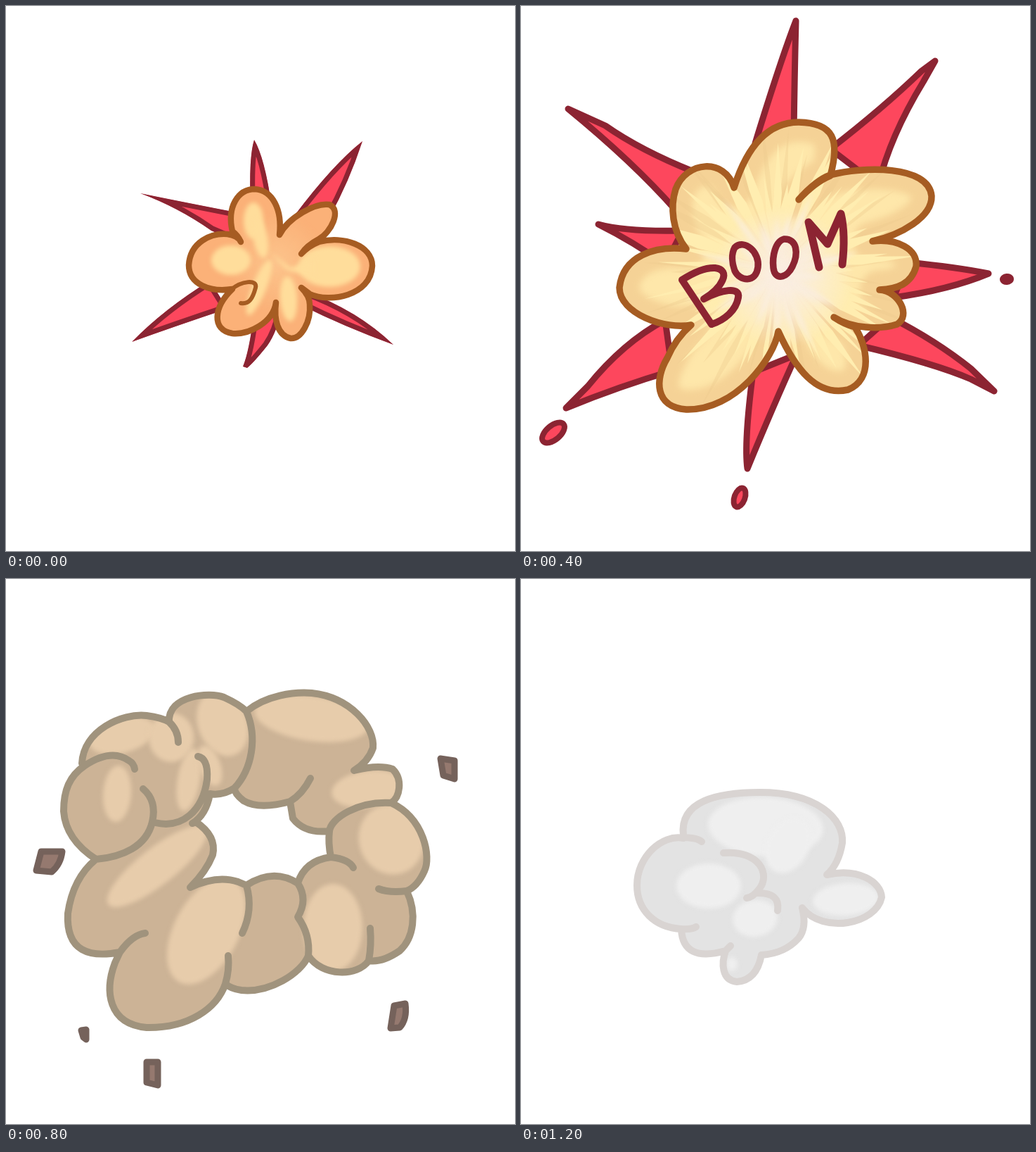
These frames come from a looping animation (724 px wide and 774 px high, 1400 ms). An HTML page with a canvas:

```html
<!DOCTYPE html>
<html>
<head>
<meta charset="utf-8">
<title>Boom</title>
<style>
html, body { margin: 0; width: 100%; height: 100%; overflow: hidden; background: #fff }
canvas { display: block }
</style>
</head>
<body>
<canvas width="724" height="774"></canvas>
<script>
const g = document.querySelector('canvas').getContext('2d');
g.lineJoin = g.lineCap = 'round';
const TAU = Math.PI * 2;

const fill = (d, color, rule = 'nonzero') => { g.fillStyle = color; g.fill(new Path2D(d), rule); };
const line = (d, color, w) => { g.strokeStyle = color; g.lineWidth = w; g.stroke(new Path2D(d)); };

function clipped(d, paint, rule = 'nonzero') {
  g.save();
  g.clip(new Path2D(d), rule);
  paint();
  g.restore();
}

function soft(px, paint) {
  g.filter = `blur(${px}px)`;
  paint();
  g.filter = 'none';
}

// spikes with needle tips: the outline lies inside the shape
const sharp = (list, color, edge, w) => list.forEach(d => clipped(d, () => {
  fill(d, color);
  line(d + 'Z', edge, w * 2);
}));

const chips = (list, color, edge, w) => list.forEach(d => { fill(d, color); line(d + 'Z', edge, w); });

// ellipses: [x, y, rx, ry, degrees]
const blobs = (list, color, edge, w) => list.forEach(([x, y, rx, ry, deg = 0]) => {
  g.beginPath();
  g.ellipse(x, y, rx, ry, deg * TAU / 360, 0, TAU);
  g.fillStyle = color;
  g.fill();
  if (edge) { g.strokeStyle = edge; g.lineWidth = w; g.stroke(); }
});

function glow(x, y, r, rgb, solid = 0) {
  const c = g.createRadialGradient(x, y, 0, x, y, r);
  c.addColorStop(solid, `rgba(${rgb},1)`);
  c.addColorStop(1, `rgba(${rgb},0)`);
  g.fillStyle = c;
  g.fillRect(x - r, y - r, 2 * r, 2 * r);
}

// brush strokes fanning out from a centre
function rays(x, y, n, near, far, w, color, seed) {
  const rnd = () => { seed = (seed * 16807) % 2147483647; return seed / 2147483647; };
  g.fillStyle = color;
  for (let i = 0; i < n; i++) {
    const r = near + (far - near) * rnd(), b = w * (.4 + .6 * rnd());
    g.save();
    g.translate(x, y);
    g.rotate((i + rnd()) / n * TAU);
    g.beginPath();
    g.moveTo(r * .15, 0);
    g.lineTo(r * .6, b);
    g.lineTo(r, 0);
    g.lineTo(r * .6, -b);
    g.fill();
    g.restore();
  }
}

const RED = '#fd475d', WINE = '#8c2432', RUST = '#a65c22', CREAM = '#ffedb0';

function spark() {
  sharp([
    'M191 266Q250 278 322 292L330 335L292 319Q245 286 191 266',
    'M353 190Q345 215 348 285L378 285Q368 215 353 190',
    'M507 192Q465 225 410 298L460 300Q488 250 507 192',
    'M551 481Q500 432 425 405L420 425Q480 455 551 481',
    'M337 512Q346 490 352 440L392 430Q386 462 372 482Q352 507 343 514',
    'M179 477Q225 430 290 390L315 430Q240 455 179 477'], RED, WINE, 7);
  const body = 'M322 320C314 285 330 260 354 260C380 262 393 290 389 325C402 300 440 279 460 282C478 290 462 322 445 331Q428 340 420 352' +
    'Q430 341 445 335C480 326 521 340 521 369C519 412 460 422 432 409L420 400Q432 412 432 424C434 448 420 473 405 472C386 468 381 445 384 421' +
    'C380 450 345 467 322 465C292 460 295 428 322 402C290 407 260 395 260 368C262 335 292 322 315 324Q330 326 334 335Q330 326 322 320Z';
  fill(body, '#fbb178');
  clipped(body, () => soft(3, () => {
    glow(385, 365, 70, '252,196,140');
    blobs([[320, 361, 28, 21], [352, 305, 14, 26], [362, 330, 10, 28, -10], [460, 370, 44, 29], [402, 416, 12, 32, -4], [360, 400, 10, 42, 22]], '#ffdd9b');
    fill('M375 350L405 372L440 358L440 385L400 375Z', '#ffdd9b');
  }));
  line(body, RUST, 8.5);
  line('M320 403C335 390 358 388 355 400C351 415 346 424 334 422', RUST, 6);
}

function burst() {
  sharp([
    'M65 149L120 172Q200 220 290 267L235 305Q160 230 95 185',
    'M351 136Q338 160 328 225L372 215Q365 165 351 136',
    'M566 102L527 135Q480 170 420 232L475 270Q510 190 553 140',
    'M575 384Q545 366 490 360L490 389Q540 378 575 384',
    'M642 533L620 505Q560 460 505 422L440 450Q530 495 605 522',
    'M337 610L330 592Q319 550 322 470L390 470Q372 535 352 590',
    'M79 554L105 520Q150 470 215 442L270 484Q180 510 125 538'], RED, WINE, 9);
  const body = 'M320 318C305 295 314 250 330 226C355 185 420 183 432 218C438 246 420 262 405 283C430 255 512 240 520 278C526 305 500 325 482 335' +
    'Q440 332 422 347Q440 334 482 336C515 347 512 380 498 392Q490 402 477 406L490 405C514 414 524 445 508 454C490 460 470 455 452 446' +
    'C460 480 455 524 435 530C405 533 376 480 381 425L300 500Q275 522 262 514C252 505 258 485 265 468C235 475 200 465 198 440' +
    'C196 400 228 362 264 354L248 354C220 345 210 315 214 295C225 260 288 250 304 280Q308 305 320 318Z';
  fill(body, '#fcd797');
  clipped(body, () => {
    soft(9, () => line(body, '#efb985', 44));
    soft(2, () => {
      rays(365, 345, 26, 120, 200, 9, 'rgba(225,170,115,.35)', 11);
      glow(370, 345, 115, '255,237,176', .25);
      rays(368, 345, 30, 90, 165, 8, 'rgba(255,237,176,.85)', 5);
    });
    const curl = 'M262 514C250 500 264 465 278 450C300 420 335 395 352 403C355 415 335 450 300 500Z';
    soft(2, () => fill(curl, '#f3c68b'));
  });
  line(body, RUST, 8);
  line('M262 505C255 500 264 467 278 450C300 418 340 393 352 403C354 415 335 440 322 453Q309 465 300 459Q301 443 316 441', RUST, 7);
}

function boom() {
  chips([
    'M391 21Q370 75 333 195L388 185Q389 100 391 21',
    'M589 78L570 92Q515 145 440 203L508 255Q525 185 572 108',
    'M67 146L120 170Q170 205 245 235L220 290Q160 222 67 146',
    'M110 310Q150 321 230 319L205 367Q160 335 110 310',
    'M64 571L95 540Q145 478 205 446L215 518Q140 540 64 571',
    'M322 657Q317 620 330 520L392 495Q360 565 322 657',
    'M673 547L640 515Q590 475 525 442L480 482Q590 508 640 530',
    'M665 380Q620 371 550 364L530 414Q610 403 665 380'], RED, WINE, 9);
  blobs([[46, 606, 19, 10, -40], [311, 698, 7.5, 14, 20], [691, 388, 6, 4, -5]], RED, WINE, 8);
  const body = 'M303 258C315 220 340 165 395 165C445 166 454 190 440 241Q418 250 395 275Q420 247 440 240C485 228 580 225 584 270C585 300 540 325 500 334' +
    'C535 330 565 345 562 370C555 395 535 402 510 403C538 405 555 440 535 452C510 460 470 458 445 442Q460 452 475 456C492 482 502 530 465 545' +
    'C420 555 390 515 366 462C360 500 305 575 235 573C190 570 190 530 208 500Q220 472 242 453C205 460 140 437 140 400C145 355 190 340 235 345' +
    'C215 320 212 285 220 260C235 220 290 215 303 258Z';
  fill(body, '#fee7aa');
  clipped(body, () => {
    soft(5, () => line(body, '#f5d296', 56));
    rays(365, 372, 36, 150, 225, 7, 'rgba(235,200,140,.35)', 21);
    rays(365, 372, 60, 110, 205, 8, CREAM, 7);
    soft(3, () => {
      glow(372, 385, 100, '251,238,224', .2);
      rays(365, 380, 20, 70, 140, 7, 'rgba(251,238,224,.8)', 3);
    });
  });
  line(body, RUST, 9.5);
  line('M229 389L271 452M229 389Q257 371 276 372C300 375 286 400 260 416C285 403 312 398 309 414C306 432 290 446 271 452', WINE, 10);
  line('M304 343C318 330 340 350 337 371C334 394 311 391 304 376C300 365 299 352 304 343', WINE, 9.5);
  line('M374 331C393 330 395 352 386 370C378 387 361 390 359 372C357 355 362 334 374 331', WINE, 9.5);
  line('M424 371L409 307L436 338L455 295Q462 325 457 367', WINE, 11);
}

function flower() {
  const red = '#c24555', dark = '#571420', edge = '#9f7b4f';
  sharp([
    'M24 184L50 167Q115 152 195 195L160 230Q105 180 50 181',
    'M632 87Q555 90 485 155L470 225L515 215Q560 140 632 87',
    'M515 475L565 477Q617 515 584 633Q578 525 520 511',
    'M382 684Q345 640 330 520L377 530Q372 620 382 684',
    'M109 567Q100 520 178 440L178 485Q130 535 116 568'], red, dark, 9);
  blobs([[103, 608, 7.5, 16, 10]], red, dark, 8);
  const body = 'M317 260Q312 235 303 215C300 160 350 85 420 85C490 88 502 165 478 212Q465 235 438 241Q455 238 467 225C500 200 560 195 590 222' +
    'C630 265 595 330 545 354Q515 367 484 370Q515 367 545 356C600 350 635 375 635 412C630 460 565 480 522 472Q505 450 470 435Q510 455 522 482' +
    'C540 555 480 575 445 570C400 565 365 535 347 500L348 490L347 500C330 550 270 585 225 582C160 575 155 510 175 460C190 420 215 393 255 400' +
    'Q210 393 182 441C150 450 120 435 121 415C125 375 155 360 180 355Q210 350 221 358Q205 351 180 353C135 335 118 285 130 245' +
    'C150 185 210 175 245 182C285 190 305 215 317 260Z';
  fill(body, '#dfb98a');
  clipped(body, () => {
    soft(3, () => {
      blobs([[410, 180, 58, 82, 22], [240, 275, 55, 72, -40], [500, 288, 40, 78, 45], [538, 407, 65, 25, -6], [440, 485, 42, 72, -42],
        [268, 475, 50, 78, 30], [200, 398, 45, 16, -25]], '#eecda4');
      glow(355, 350, 175, '232,208,152', .15);
      blobs([[383, 168, 14, 58, 15], [447, 165, 7, 28, 5], [215, 262, 15, 45, -50], [525, 280, 8, 42, 35], [182, 404, 25, 8, -30]], '#f2dba5');
      rays(355, 350, 18, 120, 185, 7, 'rgba(216,188,135,.6)', 17);
    });
    soft(1.5, () => {
      rays(355, 350, 17, 90, 150, 11, CREAM, 9);
      blobs([[358, 350, 38, 40]], CREAM);
    });
  });
  line(body, edge, 11.5);
  line('M334 373Q368 371 373 408', edge, 8);
}

// smoke: a base with soft lights, an outline, and crease lines
function smoke(out, hole, creases, lights, base, light, edge, w) {
  const all = out + hole;
  fill(all, base, 'evenodd');
  clipped(all, () => soft(3, () => blobs(lights, light)), 'evenodd');
  line(all + creases, edge, w);
}

function ring() {
  smoke('M108 262C110 215 165 190 200 194Q222 197 232 203C230 165 290 160 310 168Q332 178 342 188C370 165 410 160 435 162C490 168 525 210 522 240' +
    'Q515 260 495 272Q530 263 550 270C565 285 560 310 548 318C595 340 605 395 595 415Q585 437 570 443C585 475 580 510 560 528Q535 545 516 542' +
    'C500 565 450 565 430 535C420 560 375 588 335 584Q320 582 312 575C300 610 260 638 200 637C145 632 140 585 155 545L162 530' +
    'C120 538 85 530 88 475Q95 425 128 398Q85 370 82 330C82 300 90 280 112 265Z',
  'M270 345Q300 365 294 392Q285 415 262 438Q300 420 330 430L342 435Q380 410 415 432Q425 400 462 395Q458 375 460 358Q425 362 408 340L404 316' +
    'Q360 328 338 315Q325 305 325 297Q308 308 290 305Q285 335 265 347Z',
  'M232 203Q245 215 245 232M342 188C358 225 350 270 325 297M273 252Q288 255 286 285C280 330 250 355 212 346M112 265Q150 240 175 258Q182 262 183 270' +
    'M195 298Q215 315 208 345C200 380 165 395 128 398M162 530Q180 505 198 503M312 575Q318 555 316 535M342 435Q352 470 336 503' +
    'M415 432Q430 455 415 480Q433 505 430 535M518 496Q520 520 516 542M570 443Q545 446 530 440M548 318C500 315 462 340 460 358' +
    'M404 316Q422 305 433 283M462 395Q488 398 494 410',
  [[165, 222, 48, 25, -15], [235, 225, 32, 35], [260, 285, 16, 45, 10], [158, 305, 20, 40, 4], [308, 205, 35, 48, -20], [435, 198, 82, 32, 8],
    [515, 298, 52, 26, -8], [548, 370, 46, 50, -20], [465, 495, 42, 62], [285, 500, 46, 82, 28], [215, 408, 26, 88, 52], [290, 265, 15, 30, -20]],
  '#ccb396', '#e7ccab', '#a0937d', 10);
  chips(['M618 255L638 258L638 284L622 279', 'M50 387L80 387Q78 405 65 416L43 414', 'M552 606L568 603Q571 625 560 637L547 638',
    'M200 686L216 686L216 719L200 715', 'M107 641L114 640L114 654L110 651'], '#95796f', '#75625b', 9);
}

function puff() {
  smoke('M190 311C190 270 225 245 275 243Q312 243 320 267C340 235 390 222 415 223C470 225 500 258 494 280Q485 305 455 320C510 315 555 345 557 380' +
    'Q552 420 517 444Q532 475 510 497C490 512 465 510 448 508L455 498L448 510Q420 535 380 517Q382 536 365 538L350 537C355 575 350 600 340 615' +
    'C310 622 275 590 277 557Q218 560 214 497C190 508 140 510 138 480Q140 460 157 447C110 440 90 415 93 385C100 335 150 310 190 314Z',
  'M308 402Q330 408 355 405Q350 425 355 440Q325 455 302 470Q303 440 290 430L267 430Q290 420 308 402Z',
  'M190 313Q205 313 215 320M212 357Q222 340 255 338Q310 340 310 370Q295 415 267 430Q304 425 300 485M305 400Q352 415 372 392Q350 415 354 440' +
    'M300 478Q340 445 400 433Q450 430 446 470M234 475Q225 490 214 497M277 557Q278 515 291 505M321 529Q345 521 350 545',
  [[410, 298, 52, 88, 52], [365, 325, 36, 32], [495, 366, 68, 44, 12], [187, 382, 34, 34], [262, 384, 44, 38, -15], [210, 456, 32, 14, -25],
    [400, 465, 48, 30, -12], [332, 572, 22, 38, 5], [500, 475, 22, 32, 20]],
  '#dddad4', '#ebe4de', '#bcbcb7', 9.5);
  blobs([[631, 360, 4, 13, 4], [67, 465, 6, 11, 0], [507, 640, 6, 13, 38], [219, 749, 3, 7, -15]], '#bdb2ad', '#b2a8a3', 8);
}

function wisp() {
  smoke('M231 364C225 315 280 303 340 303C420 303 460 340 457 375Q452 405 435 420C480 410 512 430 513 452C505 490 430 505 400 467' +
    'Q407 495 395 510Q375 532 342 534Q335 570 307 572C285 570 285 545 291 528Q230 545 228 497C190 495 165 470 165 435C165 395 200 362 231 368Z', '',
  'M228 367Q250 367 257 373M228 497Q243 498 249 494M288 389C340 385 355 420 339 440Q330 452 321 453M336 446Q369 445 365 471M291 528L298 521',
  [[348, 352, 82, 42, 3], [380, 378, 30, 42, 28], [267, 436, 46, 32], [333, 482, 32, 26, -10], [462, 455, 47, 23, -4], [300, 547, 8, 10]],
  '#e3e3e3', '#efefef', '#d9d4d2', 10);
}

const scenes = [spark, burst, boom, flower, ring, puff, wisp];
let shown = -1;
function tick(t) {
  const i = Math.floor(t / 200) % scenes.length;
  if (i !== shown) {
    shown = i;
    g.fillStyle = '#fff';
    g.fillRect(0, 0, 724, 774);
    scenes[i]();
  }
  requestAnimationFrame(tick);
}
tick(0);
</script>
</body>
</html>
```
